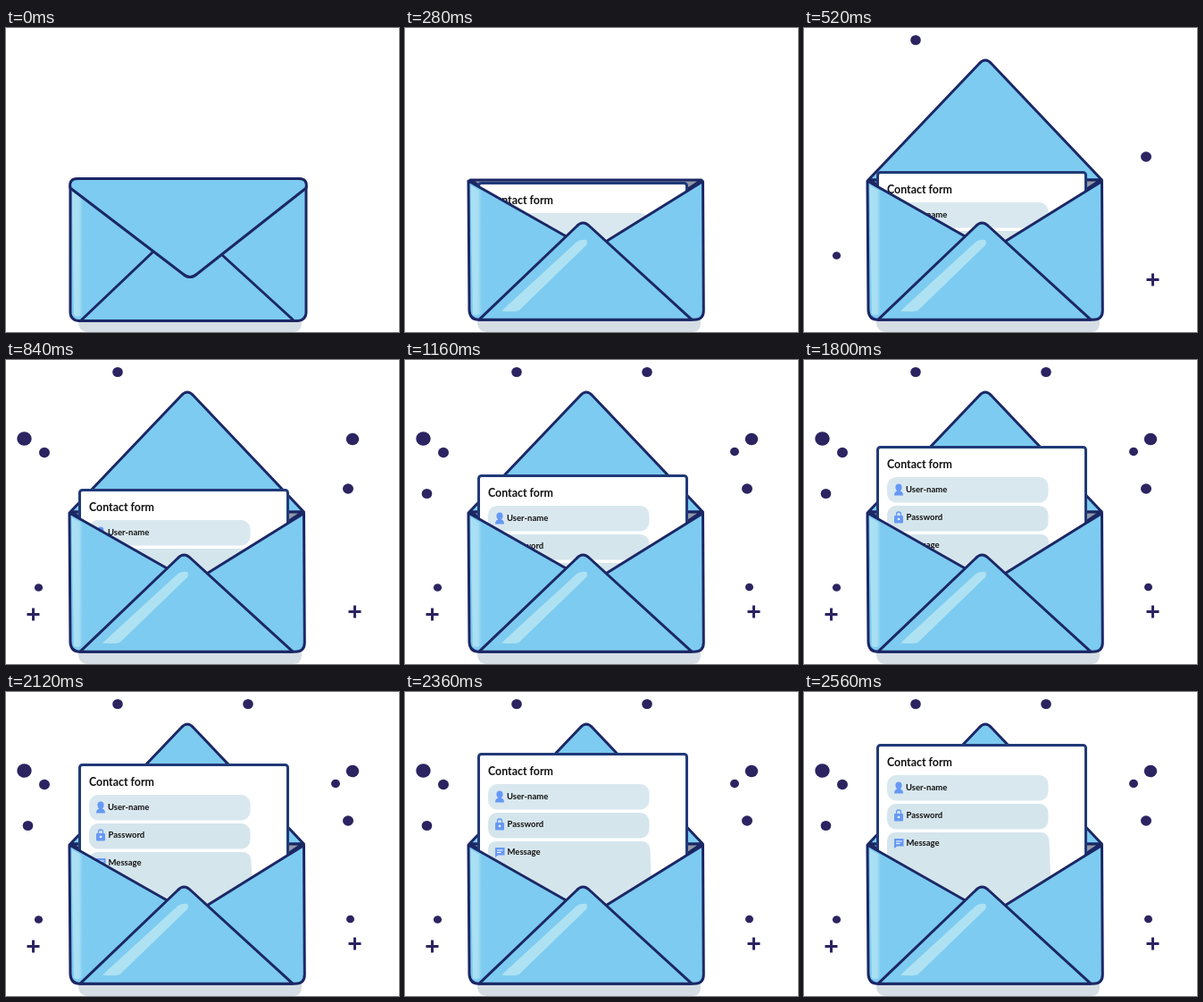
Animation of 440 by 340 pixels, one loop 2600 ms. Source, as an HTML page:

```html
<!DOCTYPE html>
<html lang="en">
<head>
<meta charset="utf-8">
<title>Contact form envelope</title>
<style>
  html, body { margin: 0; width: 100%; height: 100%; overflow: hidden; background: #fff; }
  svg { display: block; width: 440px; height: 340px; }
  .line { stroke: #1b2765; stroke-width: 3; stroke-linejoin: round; stroke-linecap: round; }
  .blue { fill: #7dcbf0; }
  .none { fill: none; }
  .paper { fill: #fff; stroke: #203a78; stroke-width: 3; }
  .field { fill: #d5e5ec; }
  .icon { fill: #6699f5; }
  .mark { fill: #2b2461; }
  text { font: 700 9.5px Lato, sans-serif; fill: #111; }
  .title { font-size: 12.4px; }
</style>
</head>
<body>
<svg viewBox="0 0 440 340">
  <defs>
    <clipPath id="inside"><rect width="440" height="300"/></clipPath>
    <linearGradient id="sheen">
      <stop offset="0" stop-color="#abe0f3"/>
      <stop offset=".65" stop-color="#a8dff3"/>
      <stop offset="1" stop-color="#7dcbf0"/>
    </linearGradient>
  </defs>

  <g id="marks" transform="translate(.5 0)"></g>
  <path fill="#d5dde5" d="M81 322H331V330Q331 340 321 340H92Q81 340 81 328Z"/>

  <g id="open">
    <path id="flapUp" class="line blue" d="M72 170L196 40Q203 32 210 40L333.500 170Z"/>
    <path class="line" fill="#9299a8" d="M73 170H332L208 252Z"/>
    <g clip-path="url(#inside)">
      <g id="letter">
        <rect class="paper" x="82.5" y="0" width="233" height="250" rx="3"/>
        <text class="title" x="93" y="23.5">Contact form</text>
        <rect class="field" style="fill:#d9e8ef" x="93" y="33.5" width="180.5" height="28.5" rx="10"/>
        <rect class="field" x="93" y="65.5" width="180.5" height="28.5" rx="10"/>
        <path class="field" d="M93 107Q93 97.500 103 97.500H264Q274 97.500 274.500 107L278 200H93Z"/>
        <text x="114" y="50.5">User-name</text>
        <text x="114.500" y="81.5">Password</text>
        <text x="114.500" y="112.5">Message</text>
        <g class="icon">
          <ellipse cx="106" cy="45" rx="3.600" ry="4"/>
          <path d="M104 47H108V49Q111 50 111 54H101Q101 50 104 49Z"/>
          <rect x="101" y="76.500" width="10" height="8.500" rx="1"/>
          <path d="M103.500 77V75a2.500 2.500 0 0 1 5 0V77" fill="none" stroke="#6699f5" stroke-width="1.300"/>
          <path d="M101 104.500H111.500V113H104L101 115.500Z"/>
        </g>
        <circle cx="106" cy="80.500" r="1.300" fill="#fff"/>
        <path d="M103 107.500H109.500M103 110H107.500" stroke="#fff"/>
      </g>
    </g>
    <path class="line blue" d="M71 171L208.500 249L333.500 171.500L334.300 316Q334.300 326.200 324 326.200H82Q73 326.200 72 316Z"/>
    <path fill="url(#sheen)" d="M73.500 176L86 183V318Q82 323 76 320Z"/>
    <path class="line blue" d="M83 326.200L192 222Q199 214 207 222L321 326.200Z"/>
    <path fill="#aee2f3" d="M108 316.500L192 239.500Q196 236 203 237Q205 239 203 243L128 315.500Q124 318 108 316.500Z"/>
    <path id="flapDown" class="line blue" d="M72 170V178L198 275Q206 282 214 275L333 178V170Z"/>
  </g>

  <g id="closed">
    <rect class="line blue" x="72" y="168.500" width="264" height="159" rx="9"/>
    <path fill="url(#sheen)" d="M74 183L86 191V320Q82 325 76 321Z"/>
    <path class="line none" d="M84 327L165 250M241 253L321 326"/>
    <path class="line blue" d="M72 179L198 275Q206 282 214 275L336 179Q338 168.500 328 168.500H80Q70 168.500 72 179Z"/>
  </g>
</svg>
<script>
const LOOP = 2600, STEP = 40, OPEN_AT = 200, OPEN_TIME = 240;
const $ = id => document.getElementById(id);
const show = (el, on) => el.setAttribute('visibility', on ? 'inherit' : 'hidden');

// x, y, radius, time of appearance; radius 0 is a plus sign
const marks = [
  [124.5, 13.5, 5.8, 320], [382.5, 144, 6, 320], [36, 254.5, 4.6, 320], [390, 281.5, 0, 320],
  [20, 88, 8.2, 600], [387.5, 88.5, 7.2, 600], [30, 284.5, 0, 600], [42.5, 103.5, 6, 600],
  [368.5, 102.5, 5, 880], [270.5, 13.5, 5.8, 880], [24, 149.5, 5.8, 880], [385, 254, 4.5, 880]
].map(([x, y, r, at]) => {
  const el = document.createElementNS('http://www.w3.org/2000/svg', r ? 'ellipse' : 'path');
  const attrs = r
    ? { cx: x, cy: y, rx: r, ry: r * 0.95, class: 'mark' }
    : { d: `M${x - 7} ${y}h14m-7 -7v14`, stroke: '#2b2461', 'stroke-width': 3 };
  for (const key in attrs) el.setAttribute(key, attrs[key]);
  $('marks').append(el);
  return { el, at };
});

// Scales a flap vertically around the fold line
function fold(el, scale) {
  show(el, scale > 0);
  el.setAttribute('transform', `translate(0 ${170 * (1 - scale)}) scale(1 ${Math.max(scale, 0.001)})`);
}

function draw(now) {
  const t = Math.floor((now % LOOP) / STEP) * STEP;
  const opened = t >= OPEN_AT;
  const turn = Math.min(1, (t - OPEN_AT + STEP) / OPEN_TIME);
  show($('open'), opened);
  show($('closed'), !opened);
  if (opened) {
    fold($('flapDown'), 1 - 2 * turn);
    fold($('flapUp'), 2 * turn - 1);
  }
  $('letter').setAttribute('transform', `translate(0 ${187.5 - t / 20})`);
  marks.forEach(({ el, at }) => show(el, t >= at));
  requestAnimationFrame(() => draw(performance.now()));
}
draw(0);
</script>
</body>
</html>
```
